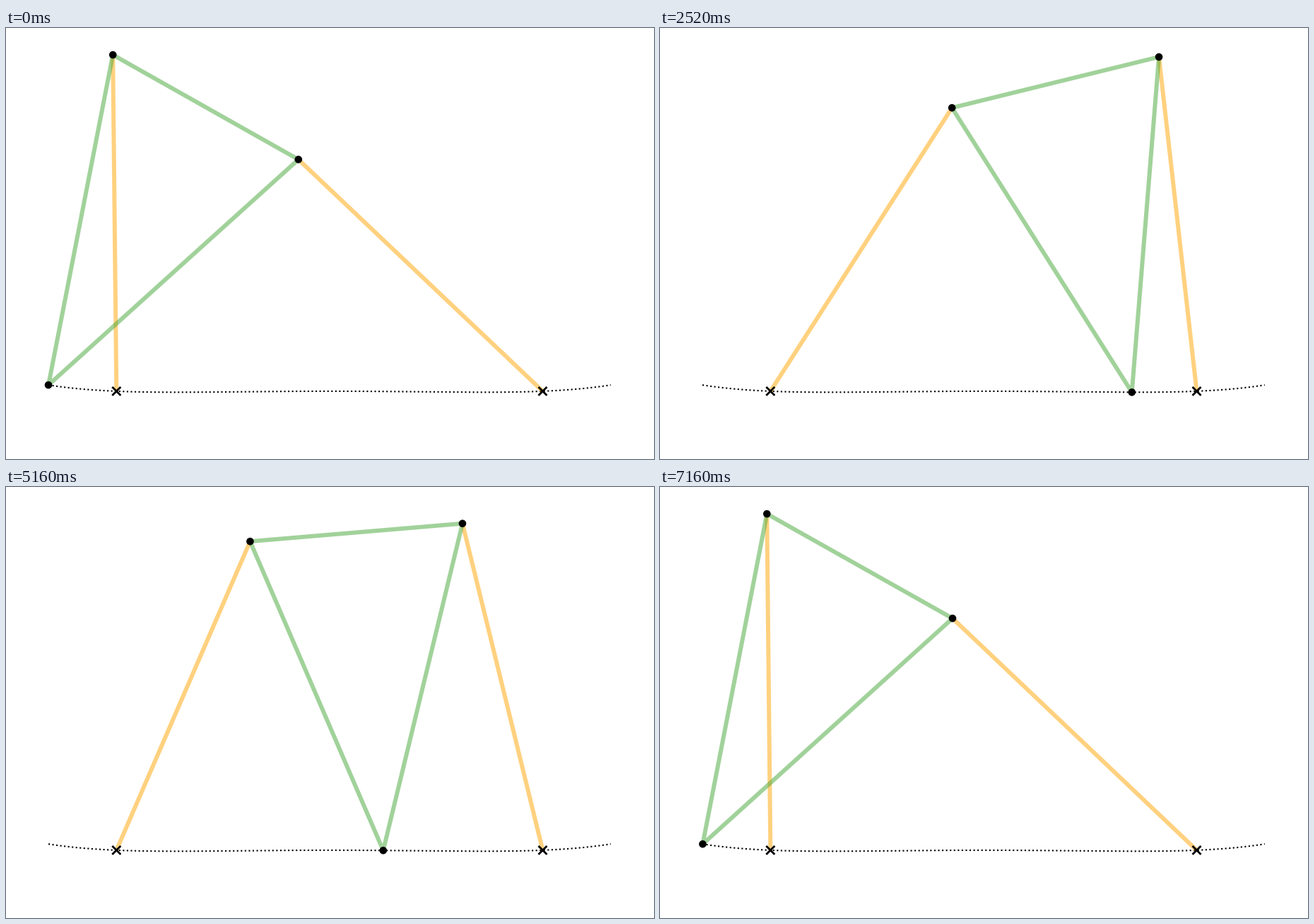
Recreate the animation shown at these times as a matplotlib script. Size 917x611 px, loop 7.2 s.

```python
import numpy as np
import matplotlib.pyplot as plt
from matplotlib.animation import FuncAnimation
from matplotlib.patches import Circle

W, H, DPI = 917, 611, 64
PX = 72 / DPI                      # points per pixel
FRAMES, INTERVAL = 180, 40
POSES = 144                        # distinct poses per loop

# Roberts linkage: ground 2R, coupler R, all other bars L
A = np.array([156.3, 514.9])
B = np.array([759.5, 514.9])
R = (B[0] - A[0]) / 2
L = R * np.sqrt(2.5)

# Coupler tilt over one sweep: (pose, degrees, degrees per pose)
KEYS = [(0, 29.46, 0), (13.6, 22.57, -1), (57, -20.83, -1),
        (67, -28.31, -0.44), (72, -29.43, 0)]


def tilt(pose):
    """Cubic Hermite through KEYS, there and back."""
    p = min(pose, POSES - pose)
    for (p0, y0, m0), (p1, y1, m1) in zip(KEYS, KEYS[1:]):
        if p <= p1:
            break
    d = p1 - p0
    t = (p - p0) / d
    ease = t * t * (3 - 2 * t)
    return (y0 + (y1 - y0) * ease + m0 * d * t * (1 - t) ** 2
            - m1 * d * t * t * (1 - t))


def linkage(deg):
    """Coupler ends and tracing point for a coupler tilt."""
    b = np.radians(deg)
    u = np.array([np.cos(b), np.sin(b)])
    d = B - R * u - A
    size = np.hypot(*d)
    rise = np.sqrt(L * L - size * size / 4)
    p = A + d / 2 + rise * np.array([d[1], -d[0]]) / size
    q = p + R * u
    c = (p + q) / 2 + 1.5 * R * np.array([-u[1], u[0]])
    return p, q, c


fig = plt.figure(figsize=(W / DPI, H / DPI), dpi=DPI, facecolor="white")
ax = fig.add_axes([0, 0, 1, 1])
ax.set_xlim(0, W)
ax.set_ylim(H, 0)
ax.axis("off")


def stroke(color, width, z, **kw):
    line, = ax.plot([], [], color=color, lw=width * PX, zorder=z,
                    snap=False, **kw)
    return line


track = np.array([linkage(a)[2] for a in np.linspace(29.46, -29.46, 300)])
stroke("black", 2.1, 1, ls=(0, (1, 1.65)), dash_capstyle="butt").set_data(*track.T)

bar = dict(alpha=0.5, solid_capstyle="butt", solid_joinstyle="round")
left = stroke("orange", 6, 2, **bar)
right = stroke("orange", 6, 2, **bar)
triangle = stroke("#45a737", 6, 3, **bar)

for x, y in (A, B):
    for s in (-1, 1):
        stroke("black", 2.8, 4, solid_capstyle="butt").set_data(
            [x - 6, x + 6], [y - 6 * s, y + 6 * s])

joints = [ax.add_patch(Circle((0, 0), 5.3, fc="black", lw=0, zorder=5))
          for _ in range(3)]


def update(i):
    pose = (4 * i + 1) // 5        # 20 poses per second on a 25 fps clock
    p, q, c = linkage(tilt(pose))
    left.set_data(*zip(A, p))
    right.set_data(*zip(B, q))
    triangle.set_data(*zip(c, p, q, c))
    for dot, pos in zip(joints, (p, q, c)):
        dot.center = pos
    return [left, right, triangle, *joints]


anim = FuncAnimation(fig, update, frames=FRAMES, interval=INTERVAL,
                     repeat=True, repeat_delay=0, blit=False)
plt.show()
```
